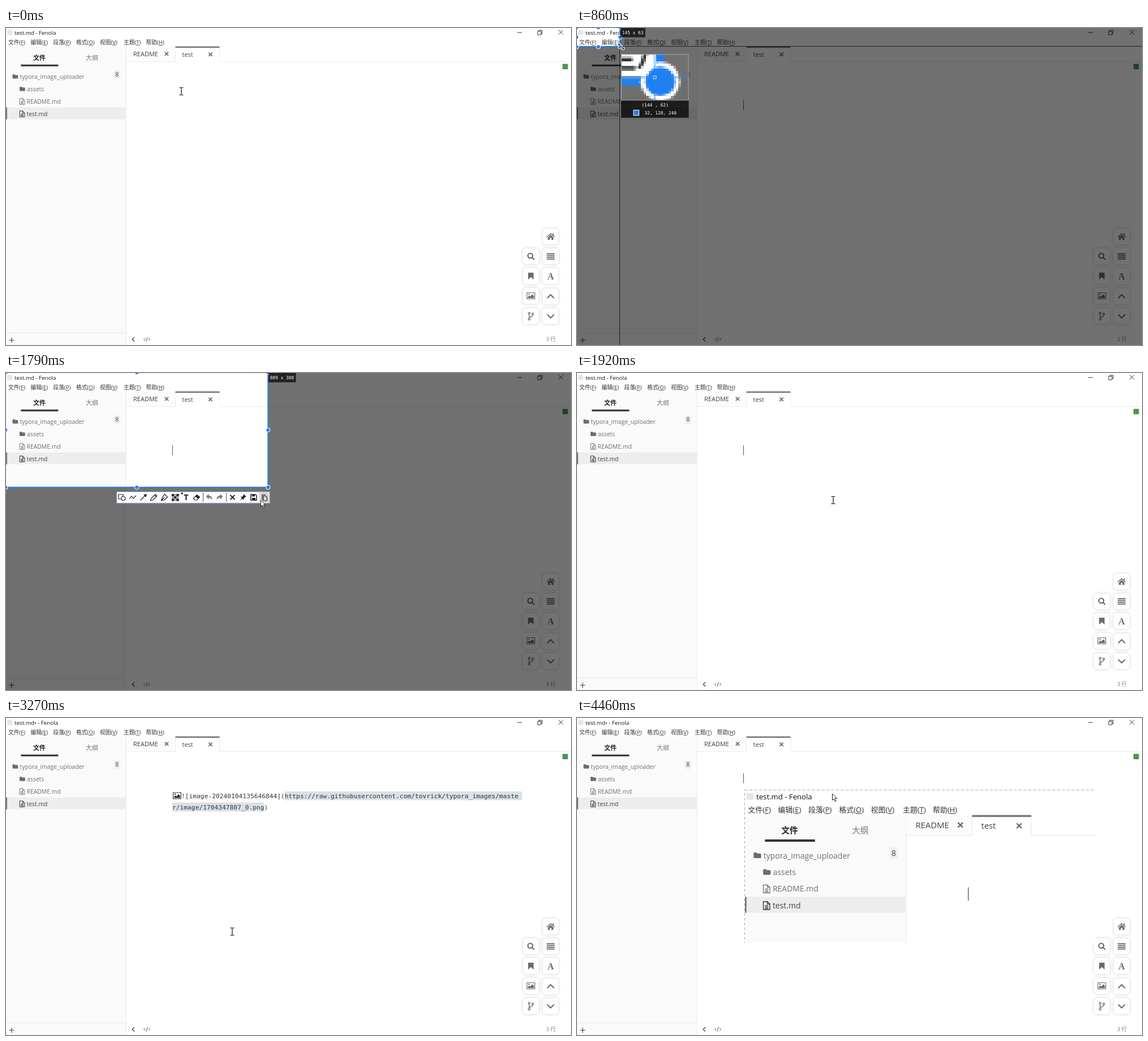
Recreate the animation shown at these times as an HTML page with a canvas. Size 999 px wide and 561 px high, loop 4540 ms.

```html
<!DOCTYPE html>
<html lang="zh">
<head>
<meta charset="utf-8">
<title>Image upload</title>
<style>
html, body { margin: 0; width: 100%; height: 100%; overflow: hidden; background: #fff; }
canvas { display: block; }
</style>
</head>
<body>
<canvas id="stage" width="999" height="561"></canvas>
<script>
const W = 999, H = 561, LOOP = 4540;
const KX = 1920 / W, KY = 1080 / H; // screen pixels per stage pixel
const BLUE = 'rgb(32,128,240)';
const SANS = '"Open Sans","Noto Sans CJK SC","Noto Sans CJK",sans-serif';
const MONO = '"DejaVu Sans Mono",monospace';
const TAU = Math.PI * 2;
const main = document.getElementById('stage').getContext('2d');
let g = main;

function layer(w, h) {
  const c = document.createElement('canvas');
  c.width = w;
  c.height = h;
  return c.getContext('2d', { willReadFrequently: true });
}

function on(ctx, draw) {
  const old = g;
  g = ctx;
  g.save();
  draw();
  g.restore();
  g = old;
}

function box(x, y, w, h, color) {
  g.fillStyle = color;
  g.fillRect(x, y, w, h);
}

// y is the middle of the capitals
function text(s, x, y, size, color, { font = SANS, weight = 400, align = 'left' } = {}) {
  g.font = `${weight} ${size}px ${font}`;
  g.textAlign = align;
  g.fillStyle = color;
  g.fillText(s, x, y + size * 0.36);
}

function icon(d, x, y, { fill, stroke, width = 1, flip = 1 }) {
  g.save();
  g.translate(x, y);
  g.scale(flip, 1);
  const p = new Path2D(d);
  if (fill) { g.fillStyle = fill; g.fill(p); }
  if (stroke) { g.strokeStyle = stroke; g.lineWidth = width; g.stroke(p); }
  g.restore();
}

function disc(x, y, r, color) {
  g.fillStyle = color;
  g.beginPath();
  g.arc(x, y, r, 0, TAU);
  g.fill();
}

const ring = (x, y, r) => `M${x + r} ${y}a${r} ${r} 0 1 1 ${-2 * r} 0a${r} ${r} 0 1 1 ${2 * r} 0z`;
const FOLDER = 'M-5-3q0-1 1-1h2.5l1 1.2h4q1.3 0 1.3 1.2v4q0 1-1 1h-7.6q-1.2 0-1.2-1z';
const DOC = 'M-4.3-5.2h5.3l3.3 3.3v7.2h-8.6zM1-5.2v3.3h3.3M-2.3 0h4.6M-2.3 1.8h4.6M-2.3 3.6h4.6';
const CROSS = 'M-3.2-3.2L3.2 3.2M3.2-3.2L-3.2 3.2';
const PHOTO = 'M-6.9-5.5h13.8v11h-13.8z';
const HILLS = 'M-5.3 4v-2l2.5-2.5 1.7 1.7 3.6-4 2.9 3V4z' + ring(-3.4, -2.6, 1.2);

const GRAY = '#6b6b6b';
const BUTTONS = [
  [963, 369, { fill: GRAY }, 'M0-6L7.5.5 6.5 1.6 0-4-6.5 1.6-7.5.5zM-4.8 1.4L0-2.8 4.8 1.4V6H1.4V2.2H-1.4V6H-4.8zM3.5-5.5h2v4l-2-2z'],
  [928, 404, { stroke: GRAY, width: 2.1 }, ring(-1, -1, 4.3) + 'M2.2 2.2L6 6'],
  [963, 404, { fill: GRAY }, [-5.4, -2.3, 0.8, 3.9].map(y => `M-7 ${y}h14v1.9h-14z`).join('')],
  [928, 439, { fill: GRAY }, 'M-4.8-6h9.6V6.2L0 1.8-4.8 6.2z'],
  [963, 439],
  [928, 474, { stroke: GRAY, width: 1.2 }, PHOTO],
  [963, 475, { stroke: GRAY, width: 2 }, 'M-6 3L0-3 6 3'],
  [928, 510, { stroke: GRAY, width: 1.3 }, 'M-3-4v8M3.3-2.5q0 2.5-3 3.3t-3.3 3' + ring(-3, -5.3, 1.6) + ring(-3, 5.3, 1.6) + ring(3.3, -4, 1.6)],
  [963, 510, { stroke: GRAY, width: 2 }, 'M-6-3L0 3 6-3'],
];
const MENU = [['文件', 'F', 4], ['编辑', 'E', 43.5], ['段落', 'P', 83.5], ['格式', 'O', 124],
  ['视图', 'V', 166], ['主题', 'T', 208], ['帮助', 'H', 247.5]];

function caret(y) {
  box(294, y, 1, 17.5, '#555');
}

function frameWindow(dirty) {
  box(0, 0, W, H, '#fff');
  box(2, 3.5, 9, 9, '#e6e6e6');
  text(`test.md${dirty ? '•' : ''} - Fenola`, 15, 8, 9.8, '#111');
  for (const [name, key, x] of MENU) {
    text(`${name}(${key})`, x, 25.5, 9.7, '#333');
    const left = x + g.measureText(name + '(').width;
    box(left, 30.2, g.measureText(key).width, 0.8, '#333');
  }
  box(904, 7.5, 8, 1, '#333');
  icon('M-4-2h6v6h-6zM-2-2v-2h6v6h-2', 944, 8, { stroke: '#333' });
  icon('M-4-4L4 4M4-4L-4 4', 981, 7.5, { stroke: '#333' });
}

function sidebar() {
  box(0, 33, 212, H, '#fafafa');
  box(212, 33, 1, H, '#eee');
  box(0, 539, 212, 1, '#e8e8e8');
  text('文件', 59, 53, 11, '#222', { weight: 700, align: 'center' });
  text('大纲', 152, 53, 11, '#777', { align: 'center' });
  box(26.3, 64.7, 66, 3.1, '#333');
  g.fillStyle = '#eee';
  g.beginPath();
  g.roundRect(191, 75, 10.5, 15, 3);
  g.fill();
  text('8', 196.2, 82.7, 10.4, '#444', { align: 'center' });
  box(0, 140.5, 212, 21, '#ededed');
  box(0, 140.5, 2, 21, '#777');
  icon(FOLDER, 16.5, 86, { fill: GRAY });
  icon(FOLDER, 29, 108, { fill: GRAY });
  icon(DOC, 28.5, 130, { stroke: '#777' });
  icon(DOC, 28.5, 152, { stroke: '#333' });
  text('typora_image_uploader', 24.5, 86.3, 10.4, '#707070');
  text('assets', 37, 108, 10.4, '#707070');
  text('README.md', 36.5, 130, 10.4, '#707070');
  text('test.md', 36.5, 152, 10.4, '#444');
  icon('M-4.5 0h9M0-4.5v9', 10, 552.5, { stroke: '#444', width: 1.2 });
}

function editor() {
  box(213, 33, 86, 26, '#fcfcfc');
  box(213, 59, 86, 1, '#ebebeb');
  box(378, 59, W, 1, '#ebebeb');
  box(299, 33, 1, 27, '#ebebeb');
  box(377, 33, 1, 27, '#ebebeb');
  box(299.5, 32.5, 78, 2.6, '#777');
  text('README', 225, 46, 11, '#444');
  text('test', 311.5, 47, 11, '#444');
  icon(CROSS, 284, 45.7, { stroke: '#666', width: 1.7 });
  icon(CROSS, 361.5, 46.7, { stroke: '#666', width: 1.7 });
  box(984, 63.5, 9.5, 9.5, '#4b9550');
  icon('M2-3.8L-1.8 0 2 3.8', 225, 551, { stroke: '#444', width: 1.3 });
  icon('M-3-2.5L-5.5 0l2.5 2.5M3-2.5L5.5 0 3 2.5M1.2-3.8L-1.2 3.8', 249, 551, { stroke: '#555' });
  text('3 行', 955, 551, 9.3, '#777');
  for (const [x, y, style, d] of BUTTONS) {
    g.save();
    g.shadowColor = 'rgba(0,0,0,.2)';
    g.shadowBlur = 5;
    g.fillStyle = '#fff';
    g.beginPath();
    g.roundRect(x - 14, y - 14, 28, 28, 5);
    g.fill();
    g.restore();
    if (d) icon(d, x, y, style);
    else text('A', x, y, 16, GRAY, { font: '"Liberation Serif",serif', weight: 700, align: 'center' });
    if (d === PHOTO) icon(HILLS, x, y, { fill: GRAY });
  }
}

function app(dirty) {
  frameWindow(dirty);
  sidebar();
  editor();
}

// the pasted screenshot, inside its dashed edge
const shot = layer(621, 271);
function takeShot() {
  on(shot, () => {
    g.translate(1, 1.1);
    g.scale(1.341, 1.341);
    app(false);
    caret(128);
    g.setTransform(1, 0, 0, 1, 0, 0);
    g.strokeStyle = '#aaa';
    g.setLineDash([5, 3.5]);
    g.strokeRect(0.5, 0.5, 640, 300);
  });
}

function picture(y, blur) {
  main.save();
  if (blur) main.filter = 'blur(1.5px)';
  main.drawImage(shot.canvas, 296, y);
  main.restore();
}

const SIZE = 11.25, STEP = 6.77;
function markdown(y, gap, first, last) {
  const code = (s, x, row) => text(s, x, row, SIZE, '#333', { font: MONO });
  const mark = '#d9e2e9', start = 310 + 27 * STEP;
  box(start, y - 7.5, (first.length + 1) * STEP, 15.5, mark);
  box(294, y + gap - 8, last.length * STEP, 16, mark);
  icon(PHOTO, 302.5, y, { stroke: '#333', width: 1.2 });
  icon(HILLS, 302.5, y, { fill: '#333' });
  code('![image-20240104135646844](', 310, y);
  code(first, start, y);
  code(last + ')', 294, y + gap);
}

function localLink() {
  markdown(135, 19.5, 'C:/Users/     /AppData/Roaming/Typora/typora-user-images/image', '-20240104135646844.png');
  for (let i = 0; i < 9; i++) {
    for (let j = 0; j < 3; j++) {
      box(555 + i * 3.7, 130 + j * 3.5, 3.7, 3.5, `hsl(208 16% ${30 + (i * 5 + j * 3 + i * j) % 7 * 9}%)`);
    }
  }
}

function remoteLink() {
  markdown(137.5, 20, 'https://raw.githubusercontent.com/tovrick/typora_images/maste', 'r/image/1704347807_0.png');
}

function uploading(t) {
  box(568, 243, 78, 78, 'rgba(0,0,0,.5)');
  text('Uploading', 607, 265, 9.1, '#e2e2e2', { font: '"Liberation Mono",monospace', align: 'center' });
  for (let i = 0; i < 3; i++) {
    box(594.3 + i * 9.4, 292 + 1.9 * Math.sin((t - 2390) / 120 - 1.2 + i * 1.2), 6.5, 6.5, '#d8d8d8');
  }
}

function selection(w, h) {
  g.fillStyle = 'rgba(0,0,0,.556)';
  g.beginPath();
  g.rect(0, 0, W, H);
  g.rect(0, 0, w, h);
  g.fill('evenodd');
}

function handles(w, h) {
  g.strokeStyle = BLUE;
  g.lineWidth = 1.7;
  g.strokeRect(-0.8, -0.8, w + 1.6, h + 1.6);
  for (const x of [-0.8, w / 2, w + 0.8]) {
    for (const y of [-0.8, h / 2, h + 0.8]) {
      if (x === w / 2 && y === h / 2) continue;
      disc(x, y, 4.1, '#fff');
      disc(x, y, 3.1, BLUE);
    }
  }
}

const lens = layer(27, 19);
function magnifier(x, y, w, h) {
  const px = Math.round(x * KX), py = Math.round(y * KY), dot = 4.41;
  const left = x + (x < 1 ? 5 : 3), top = y + 14.8;
  on(lens, () => {
    for (let i = 0; i < 14; i++) {
      for (let j = 0; j < 10; j++) box(i * 2, j * 2, 2, 2, (i + j) % 2 ? '#fff' : '#ddd');
    }
    g.translate(13 - px, 9 - py);
    g.scale(KX, KY);
    app(false);
    caret(128);
    selection(w, h);
    handles(w, h);
  });
  const rgb = [...lens.getImageData(13, 9, 1, 1).data].slice(0, 3).join(', ');
  const cx = left + 13 * dot, cy = top + 40.5 - dot / 2;
  g.save();
  g.beginPath();
  g.rect(left, top, 119, 81);
  g.clip();
  g.imageSmoothingEnabled = false;
  g.drawImage(lens.canvas, left, cy - 9 * dot, 27 * dot, 19 * dot);
  g.restore();
  box(cx, top, dot, 81, 'rgba(32,128,240,.35)');
  box(left, cy, 119, dot, 'rgba(32,128,240,.35)');
  g.lineWidth = 1;
  g.strokeStyle = 'rgba(255,255,255,.75)';
  g.strokeRect(cx - 0.3, cy - 0.3, 5, 5);
  box(left, top + 81, 119.5, 31, 'rgba(0,0,0,.75)');
  g.strokeStyle = '#a8a8a8';
  g.strokeRect(left + 0.5, top, 118.5, 81);
  text(`(${px} , ${py})`, left + 60, top + 89.8, 7.9, '#fff', { font: MONO, align: 'center' });
  box(left + 21.5, top + 98, 10.5, 10.5, '#fff');
  box(left + 22.5, top + 99, 8.5, 8.5, `rgb(${rgb})`);
  text(rgb, left + 41.5, top + 103.3, 7.8, '#fff', { font: MONO });
}

function sizeLabel(w, h) {
  const s = `${Math.round(w * KX)} x ${Math.round(h * KY)}`, x = w < W ? w + 1.5 : 0;
  g.font = `7.85px ${MONO}`;
  box(x, 0, g.measureText(s).width + 6, 16.5, 'rgba(0,0,0,.7)');
  text(s, x + 2.7, 8, 7.85, '#fff', { font: MONO });
}

function toolbar(hover) {
  const ink = '#222', line = { stroke: ink, width: 1.2 }, solid = { fill: ink }, y = 220;
  box(195.5, 210, 271, 20.5, '#a9cdf8');
  box(196.5, 211, 269, 18.5, '#fff');
  if (hover) box(447.5, 211, 18, 18.5, '#d9d9d9');
  icon('M2-1v-4h-8v8h4' + ring(2.3, 2, 3.5), 205, y, line);
  icon('M-6 3L-2-2 1 2 6-3', 224, y, line);
  icon('M-5.5 5.5L3-3', 243, y, line);
  icon('M6-6L4.5 0 0-4.5z', 243, y, solid);
  icon('M-6 6l1-4 7.5-7.5 3 3-7.5 7.5zM1-4l3 3', 261.5, y, line);
  icon('M-5.5 6l2-6 4-5.5 5 5-5 5zM-5.5 6L0 0', 280, y, line);
  for (let i = 0; i < 9; i++) box(293 + i % 3 * 4.2, 214 + Math.floor(i / 3) * 4.2, 4.2, 4.2, i % 2 ? '#aaa' : ink);
  disc(311.3, 213, 1.7, ink);
  text('T', 318.5, y, 14.5, ink, { weight: 700, align: 'center' });
  icon('M-5.5 2l6-6.5 5 4-5 5.5h-3.5z', 337, y, line);
  icon('M.5-4.5l5 4-3 3-5-4z', 337, y, solid);
  box(348, 212, 1, 16, '#555');
  const undo = 'M-6-1.5l5-4.5v3q6.5 0 6 8-1.5-4.2-6-4v3z';
  icon(undo, 359.5, y, { fill: '#808080' });
  icon(undo, 377.5, y, { fill: '#808080', flip: -1 });
  box(389, 212, 1, 16, '#555');
  icon('M-4-4L4 4M4-4L-4 4', 400.5, y, { stroke: ink, width: 1.9 });
  icon('M1-6l5 5-2 .5-2.5 2.5v3l-2.5-2.5-4.5 3.5 3.5-4.5-2.5-2.5h3l2.5-2.5z', 419, y, solid);
  icon('M-5-5h8l2 2v8h-10z', 438, y, { stroke: ink, width: 1.6 });
  icon('M-3-5h5v3.5h-5zM-3 1h6v4h-6z', 438, y, solid);
  icon('M2-5h-6v9M-2-3h4l2.5 2.5v6h-6.5z', 457, y + 0.5, line);
}

function pointer(kind, x, y) {
  if (kind === 'beam') icon('M-3.5-6.5h2.5l1 .7 1-.7h2.5M0-6v12M-3.5 6.5h2.5l1-.7 1 .7h2.5', x, y, { stroke: '#111', width: 1.2 });
  if (kind === 'arrow') icon('M0 0v11.5l2.7-2.5 1.9 4.5 2-.9-1.9-4.3h3.6z', x, y, { fill: '#fff', stroke: '#222' });
  if (kind === 'size') {
    const d = 'M-5.5-5.5h4.5l-1.6 1.6 6.5 6.5 1.6-1.6v4.5h-4.5l1.6-1.6-6.5-6.5-1.6 1.6z';
    icon(d, x + 3, y + 1, { fill: '#111', stroke: '#fff' });
  }
}

const BURSTS = [[0, 70, 2], [390, 720, 6], [860, 1320, 8], [1390, 1850, 8], [1920, 2120, 4], [2260, 2720, 8],
  [2790, 3270, 8], [3330, 3800, 8], [3870, 4060, 3], [4200, 4460, 2]];
const TICKS = BURSTS.flatMap(([a, b, n]) =>
  Array.from({ length: n }, (_, i) => Math.floor((a + (b - a) * i / (n - 1)) / 10) * 10));

const PATH = [[0, 310, 112], [390, 310, 112], [650, 20, 10], [720, 0, 0], [860, 75, 32], [920, 190, 81],
  [990, 300, 128], [1050, 385, 165], [1120, 438.1, 187], [1250, 458, 199], [1320, 462.05, 201],
  [1450, 462.05, 201], [1780, 450.5, 225], [1850, 453, 225], [1920, 453, 225], [2120, 423, 165],
  [2260, 421, 160], [2390, 421, 160], [2720, 415, 215], [3270, 400, 378], [3330, 402, 370],
  [3800, 432, 237], [4060, 447, 110], [4450, 447, 110], [4460, 451.5, 134], [LOOP, 451.5, 134]];

function at(t) {
  const i = PATH.findIndex(p => p[0] > t);
  const [t0, x0, y0] = PATH[i - 1], [t1, x1, y1] = PATH[i];
  const f = (t - t0) / (t1 - t0);
  return [x0 + (x1 - x0) * f, y0 + (y1 - y0) * f];
}

function capture(t, x, y) {
  const aiming = t < 1450;
  const [w, h] = t < 860 ? [W, H] : aiming ? [x + 1 / KX, y + 1 / KY] : [889 / KX, 388 / KY];
  selection(w, h);
  if (aiming && x >= 1) {
    box(x, 0, 0.7, H, '#000');
    box(0, y, W, 0.7, '#000');
  }
  handles(w, h);
  if (aiming) magnifier(x, y, w, h);
  else toolbar(t >= 1700);
  sizeLabel(w, h);
}

function draw(t) {
  const [x, y] = at(t);
  const capturing = t >= 390 && t < 1850;
  app(t >= 2120);
  if (t >= 70 && t < 2260) caret(128);
  if (t >= 2260 && t < 2980) {
    localLink();
    picture(167, true);
    uploading(t);
  } else if (t >= 2980 && t < 4060) {
    remoteLink();
  }
  if (t >= 3460) picture(t < 4200 ? 167 : 127, false);
  if (t >= 4060) caret(98);
  if (capturing) capture(t, x, y);
  const kind = t >= 4460 ? 'arrow' : !capturing ? 'beam' : t >= 1450 ? 'arrow' : t >= 860 ? 'size' : '';
  pointer(kind, x, y);
}

let shown = -1;
function tick(now) {
  const time = now % LOOP;
  const t = TICKS.findLast(v => v <= time);
  if (t !== shown) draw(shown = t);
  requestAnimationFrame(tick);
}

takeShot();
requestAnimationFrame(tick);
</script>
</body>
</html>
```
